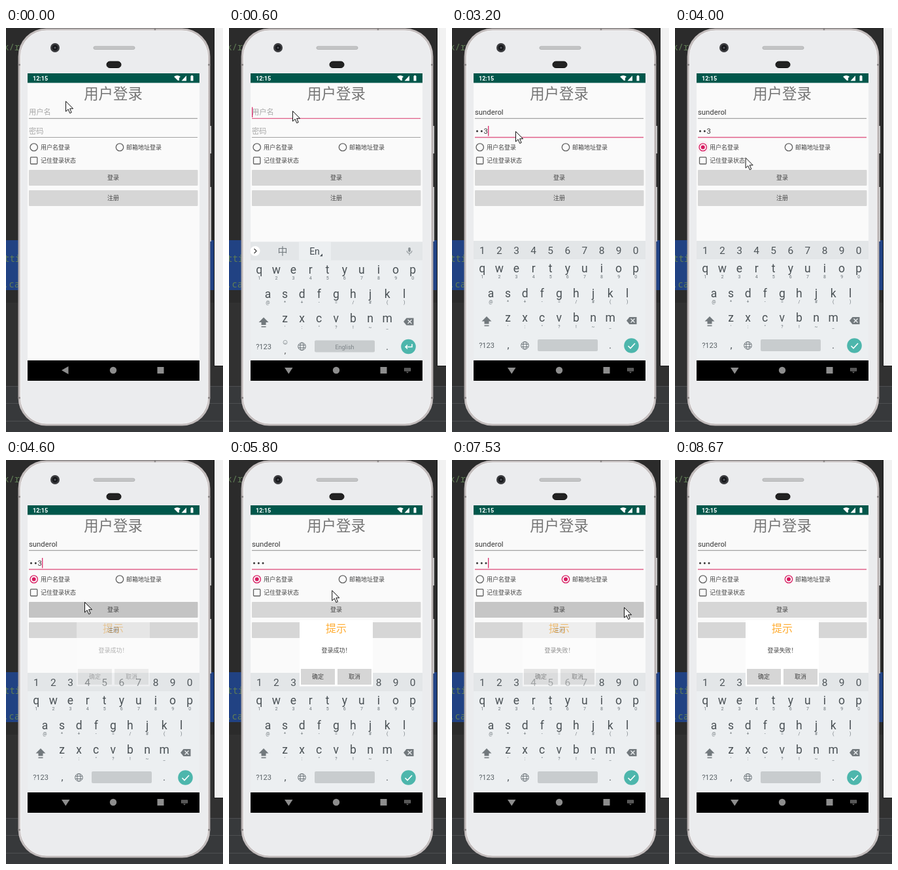
Recreate the animation shown at these times as an HTML page. Size 332 by 615 pixels, loop 9.19 s.

```html
<!DOCTYPE html>
<html lang="zh-CN">
<head>
<meta charset="utf-8">
<style>
html, body { margin: 0; width: 100%; height: 100%; overflow: hidden; background: #2b2b2b; }
#stage { display: block; }
text { font-family: Roboto, "Noto Sans CJK SC", "Noto Sans CJK", sans-serif; font-size: 9px; fill: #444; white-space: pre; }
.mid { text-anchor: middle; }
.code { font: 14px "Noto Sans Mono", monospace; fill: #5f7c55; }
.field { font-size: 11.3px; fill: #383838; }
.hint { font-size: 11.3px; fill: #a9a9a9; }
.key { font-size: 17.5px; fill: #4a5155; }
.num { font-size: 15.5px; fill: #4e5559; }
.sub { font-size: 7px; fill: #6b7378; }
.ring { fill: none; stroke: #606060; stroke-width: 1.3; }
</style>
</head>
<body>
<svg id="stage" width="332" height="615" viewBox="0 0 332 615">
  <defs>
    <linearGradient id="shell">
      <stop offset="0" stop-color="#aaa4a4"/><stop offset=".01" stop-color="#d0caca"/>
      <stop offset=".02" stop-color="#c2bcbc"/><stop offset=".98" stop-color="#c2bcbc"/>
      <stop offset=".99" stop-color="#d0caca"/><stop offset="1" stop-color="#aaa4a4"/>
    </linearGradient>
  </defs>

  <!-- editor behind the phone -->
  <rect width="332" height="615" fill="#2b2b2b"/>
  <rect y="323" width="332" height="76" fill="#214283"/>
  <rect y="418" width="332" height="127" fill="#313131"/>
  <rect y="545" width="332" height="70" fill="#37393b"/>
  <path d="M0 545.5H332M0 571.5H332M0 598.5H332" stroke="#4d4f51"/>
  <text class="code" x="-4" y="34">k/r</text>
  <text class="code" x="-3" y="356">tti</text>
  <text class="code" x="-4" y="395">.ca</text>
  <rect x="318.5" y="-1" width="15" height="515.5" fill="#f2f2f2" stroke="#161616"/>

  <!-- phone -->
  <path d="M311 149h3v42h-3zM311 242h3v83h-3z" fill="#d4d4d5"/>
  <rect x="18.500" y=".5" width="294" height="605" rx="43" fill="url(#shell)"/>
  <path d="M18.500 56h5M307.500 56h5M18.500 563h5M307.500 563h5M228 .5v3.500" stroke="#8b8686" stroke-width="2.500"/>
  <rect x="22.500" y="4" width="286" height="598" rx="39" fill="#ebecee" stroke="#f5f5f6"/>
  <circle cx="75" cy="30" r="7" fill="#3a3b3e"/>
  <circle cx="75" cy="30" r="4.2" fill="#17181b"/>
  <circle cx="75" cy="30" r="1.6" fill="#53565c"/>
  <rect x="134" y="28" width="63" height="4.500" rx="2.2" fill="#c4c5c6" stroke="#a9aaab" stroke-width=".8"/>
  <rect x="154" y="51" width="22" height="9.5" rx="4.7" fill="#222" stroke="#0b0b0b"/>

  <!-- screen -->
  <rect x="33" y="69" width="263" height="468" fill="#fafafa"/>
  <rect x="33" y="69" width="263" height="14.5" fill="#00574b"/>
  <text x="41" y="79.7" style="fill:#fff;font-weight:700">12:15</text>
  <path d="M257 74q5-3.5 10 0l-2 2v4h-2zM276 72.5v8h-7.500zM282.500 73h1v-1h2v1h1v7.500h-4z" fill="#fff"/>
  <text class="mid" x="164" y="107.500" style="font-size:22.4px;fill:#757575">用户登录</text>

  <text class="hint" id="nameHint" x="35" y="132.3">用户名</text>
  <text class="field" id="name" x="35" y="132"></text>
  <path id="nameLine" d="M35 137.600H293"/>
  <text class="hint" id="passHint" x="35" y="161.3">密码</text>
  <g id="dots" fill="#333">
    <circle cx="38.500" cy="157" r="1.5"/><circle cx="45.300" cy="157" r="1.5"/><circle cx="52" cy="157" r="1.5"/>
  </g>
  <text class="field" id="digit" y="161"></text>
  <path id="passLine" d="M35 166.500H293"/>
  <rect id="caret" width="1.2" fill="#d81b60"/>

  <g id="radios"></g>
  <text x="53" y="184.700">用户名登录</text>
  <text x="184" y="184.700">邮箱地址登录</text>
  <rect class="ring" x="37.500" y="196.700" width="10.300" height="10.300" rx="1"/>
  <text x="53" y="205.300">记住登录状态</text>
  <rect id="login" x="35" y="216" width="258.500" height="24" rx="1"/>
  <text class="mid" x="164" y="231.300">登录</text>
  <rect x="35" y="247" width="258.500" height="24" rx="1" fill="#d6d6d6"/>
  <text class="mid" x="164" y="262.300">注册</text>

  <!-- keyboard -->
  <svg x="33" y="324" width="263" height="182" viewBox="33 324 263 182">
    <g id="board">
      <rect x="33" y="324" width="263" height="182" fill="#eceff1"/>
      <rect x="33" y="324" width="263" height="28" fill="#e3e6e8"/>
      <g id="keys"></g>
      <path d="M53 439l7.500 7.500h-4v4h-7v-4h-4zM49.500 452.500h7v1.500h-7z" fill="#72797d"/>
      <path d="M267 445.500l4.500-5.500h11v11h-11z" fill="#72797d"/>
      <path d="M273.500 442.500l6 6m0-6l-6 6" stroke="#eceff1" stroke-width="1.300"/>
      <text class="mid" x="53" y="487.300" style="font-size:11px;fill:#5a6267">?123</text>
      <g fill="none" stroke="#6b7378">
        <circle cx="111.500" cy="483.300" r="5.800"/><ellipse cx="111.500" cy="483.300" rx="2.600" ry="5.800"/>
        <path d="M106.300 481.300h10.400m0 4h-10.400"/>
      </g>
      <rect x="131" y="474" width="92" height="18" rx="2" fill="#c8ccce"/>
      <text class="mid num" x="242" y="488">.</text>
      <circle cx="274.500" cy="483.500" r="11.300" fill="#4db6ac"/>
      <g id="latin">
        <circle cx="40" cy="338" r="7.500" fill="#fff"/>
        <path d="M38.500 334.500l3.500 3.500l-3.500 3.500" fill="none" stroke="#444" stroke-width="1.300"/>
        <text class="mid" x="82" y="343.500" style="font-size:15px;fill:#757c80">中</text>
        <rect x="107" y="324" width="49" height="28" fill="#eceff1"/>
        <text class="mid" x="131" y="343" style="font-size:14px;fill:#424a50">En</text>
        <path d="M143 342v4h-4z" fill="#424a50"/>
        <rect x="274.200" y="332.500" width="3.600" height="7" rx="1.800" fill="#8a9195"/>
        <path d="M272 337.500a4 4 0 0 0 8 0M276 341.500v3" fill="none" stroke="#8a9195"/>
        <g fill="none" stroke="#8a9195" stroke-width=".8">
          <circle cx="86" cy="477" r="3"/><path d="M84.500 478q1.500 1.500 3 0"/>
        </g>
        <text class="mid" x="86" y="493" style="font-size:12px">,</text>
        <text class="mid" x="177" y="487" style="fill:#7d8488">English</text>
        <path d="M280 479.500v4.500h-10m3-3l-3 3l3 3" fill="none" stroke="#fff" stroke-width="1.500"/>
      </g>
      <g id="digits">
        <text class="mid num" x="86" y="487.500">,</text>
        <path d="M269.500 484l3.500 3.500l7-7.500" fill="none" stroke="#fff" stroke-width="1.600"/>
      </g>
    </g>
  </svg>

  <!-- navigation bar -->
  <rect x="33" y="506" width="263" height="31"/>
  <g fill="#8d8d8d">
    <path id="back"/>
    <circle cx="164" cy="521" r="5.200"/>
    <rect x="231.500" y="516" width="10" height="10"/>
    <g id="switcher" fill="#707070">
      <path d="M268 517.500h10v5h-10zM271 523.500h4l-2 2z"/>
      <path d="M269 519.200h8M269 521h8" stroke="#000" stroke-width=".7" stroke-dasharray="1 .8"/>
    </g>
  </g>

  <g id="popup">
    <rect x="108" y="244" width="112" height="100.500" fill="#fff"/>
    <text class="mid" x="164" y="262" style="font-size:16px;fill:#ffad33">提示</text>
    <text class="mid" id="message" x="164" y="293.300"></text>
    <path d="M110 318h52v24h-52zM166 318h52v24h-52z" fill="#d6d6d6"/>
    <text class="mid" x="136" y="333.300">确定</text>
    <text class="mid" x="192" y="333.300">取消</text>
  </g>

  <path id="mouse" d="M.5.500v15.500l3.600-3.400l2.600 6l2.500-1.100l-2.600-5.800h5z" fill="#fff" stroke="#111"/>
</svg>
<script>
const LOOP = 9190, BLINK = 496;
const USER = "sunderol";
const NAME_TIMES = [800, 1070, 1200, 1400, 1500, 1600, 1700, 1800];
const PASS_TIMES = [3000, 3100, 3200];
const FOCUS_NAME = 270, FOCUS_PASS = 2670, HIDE_DIGIT = 4670;
const PICK_NAME = 3740, PICK_MAIL = 6230;

// [time, x, y] of the pointer
const PATH = [
  [0, 91, 111], [70, 94, 118], [130, 97, 126], [2180, 97, 126], [2470, 97, 157],
  [3250, 97, 157], [3470, 95, 177], [3800, 95, 178], [4200, 120, 216], [5450, 120, 216],
  [6130, 191, 182], [6380, 191, 182], [6730, 263, 224], [7750, 263, 224],
  [8200, 321, 370], [8350, 225, 500], [8480, 312, 582], [8530, 340, 590]
];

const $ = id => document.getElementById(id);
const clamp = v => Math.max(0, Math.min(1, v));
const ramp = (t, start, length) => clamp((t - start) / length);
const show = (id, on) => $(id).style.display = on ? "" : "none";
const put = (id, attrs) => { for (const k in attrs) $(id).setAttribute(k, attrs[k]); };
const typed = (times, t) => times.filter(s => s <= t).length;

function label(x, y, s, cls) {
  const e = document.createElementNS("http://www.w3.org/2000/svg", "text");
  e.setAttribute("x", x);
  e.setAttribute("y", y);
  e.setAttribute("class", "mid " + cls);
  e.textContent = s;
  return e;
}

function row(id, x, y, keys, cls) {
  [...keys].forEach((k, i) => $(id).append(label(x + 26.1 * i, y, k, cls)));
}
row("keys", 46.3, 372.3, "qwertyuiop", "key");
row("keys", 46.3, 381, "1234567890", "sub");
row("keys", 59.4, 409.6, "asdfghjkl", "key");
row("keys", 59.4, 418.5, "@*+-=/#()", "sub");
row("keys", 85.5, 446.9, "zxcvbnm", "key");
row("keys", 85.5, 456.5, "':\"?!~_", "sub");
row("digits", 46.3, 344, "1234567890", "num");

function pointer(t) {
  const i = PATH.findIndex(p => p[0] > t);
  if (i < 0) return [340, 590];
  const [a, b] = [PATH[i - 1], PATH[i]];
  let k = (t - a[0]) / (b[0] - a[0]);
  if (t < 8000 && t > 130) k = k * k * (3 - 2 * k);
  return [a[1] + (b[1] - a[1]) * k, a[2] + (b[2] - a[2]) * k];
}

function radio(x, on, since) {
  const wave = since > 0 && since < 350 ? .16 * (1 - since / 350) : 0;
  const color = on ? "#d81b60" : "#606060";
  return `<circle cx="${x}" cy="181.500" r="10" fill="#d81b60" opacity="${wave}"/>` +
    `<circle class="ring" cx="${x}" cy="181.500" r="5.700" style="stroke:${color}"/>` +
    (on ? `<circle cx="${x}" cy="181.500" r="${3 * ramp(since, 0, 130)}" fill="${color}"/>` : "");
}

function drawFields(t) {
  const n = typed(NAME_TIMES, t), p = typed(PASS_TIMES, t);
  const onPass = t >= FOCUS_PASS, onName = t >= FOCUS_NAME && !onPass;
  $("name").textContent = USER.slice(0, n);
  show("nameHint", !n);
  show("passHint", !p);
  const hidden = t >= HIDE_DIGIT ? p : p - 1;
  [...$("dots").children].forEach((c, i) => c.style.display = i < hidden ? "" : "none");
  $("digit").textContent = p > hidden && p ? p : "";
  put("digit", { x: 35 + 6.7 * (p - 1) });
  for (const [id, on] of [["nameLine", onName], ["passLine", onPass]])
    put(id, { stroke: on ? "#df6089" : "#a2a2a2", "stroke-width": on ? 1.4 : 1.1 });

  const times = onPass ? [FOCUS_PASS, ...PASS_TIMES] : [FOCUS_NAME, ...NAME_TIMES];
  const last = times.filter(s => s <= t).pop();
  show("caret", (onName || onPass) && Math.floor((t - last) / BLINK) % 2 === 0);
  const x = onPass ? 35 + 6.7 * p : 35 + (n ? $("name").getComputedTextLength() : 0);
  put("caret", { x, y: onPass ? 149 : 120.5, height: 15.5 });
}

function drawBoard(t) {
  const k = ramp(t, 330, 340);
  put("board", { transform: `translate(0 ${182 * (1 - k) ** 3})` });
  show("board", t > 330);
  show("latin", t < FOCUS_PASS);
  show("digits", t >= FOCUS_PASS);
  const up = t >= 400;
  put("back", { d: up ? "M85 517h12.500l-6.200 9.500z" : "M85 521l10.500-6v12z" });
  show("switcher", up);
}

function drawPopup(t) {
  const failed = t >= 7300;
  $("message").textContent = failed ? "登录失败！" : "登录成功！";
  $("popup").style.opacity = failed ? ramp(t, 7400, 220)
    : ramp(t, 4510, 230) * (1 - ramp(t, 6670, 260));
}

function draw(t) {
  drawFields(t);
  drawBoard(t);
  drawPopup(t);
  const mail = t >= PICK_MAIL, user = t >= PICK_NAME && !mail;
  $("radios").innerHTML = radio(42.7, user, t - PICK_NAME) + radio(174, mail, t - PICK_MAIL);
  const press = s => ramp(t, s, 150) * (1 - ramp(t, s + 300, 300));
  const tone = 214 - Math.round(18 * Math.max(press(4400), press(7200)));
  put("login", { fill: `rgb(${tone},${tone},${tone})` });
  put("mouse", { transform: `translate(${pointer(t)})` });
}

const start = performance.now();
function tick() {
  draw((performance.now() - start) % LOOP);
  requestAnimationFrame(tick);
}
tick();
</script>
</body>
</html>
```
